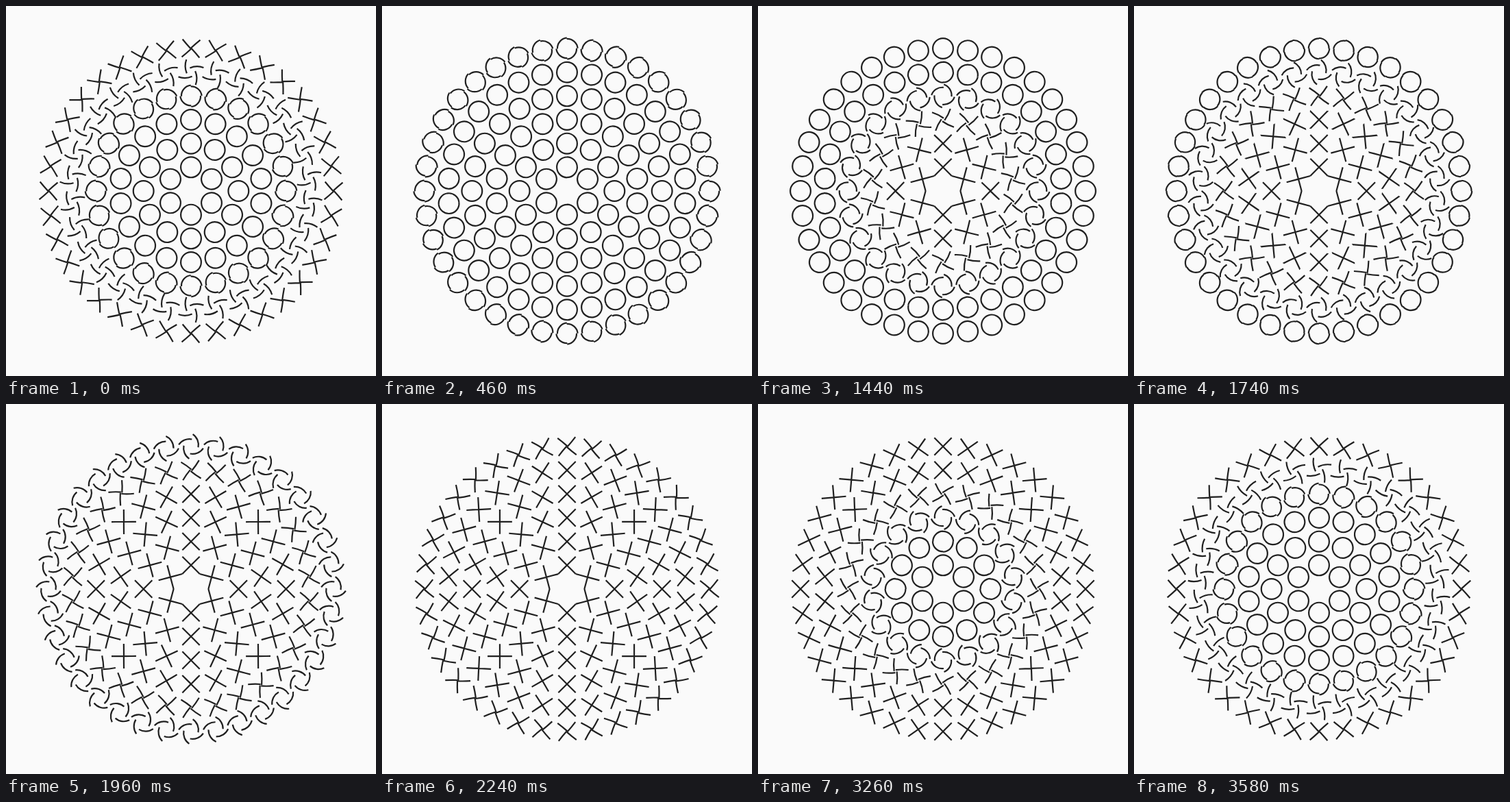
An HTML page with a canvas that plays this animation: 540 by 540 pixels, repeating every 3600 ms.

```html
<!DOCTYPE html>
<html lang="en">
<head>
<meta charset="utf-8">
<title>Circles and crosses</title>
<style>
  html, body { margin: 0; width: 100%; height: 100%; overflow: hidden; background: #fafafa; }
  canvas { display: block; width: 540px; height: 540px; }
</style>
</head>
<body>
<canvas id="stage" width="540" height="540"></canvas>
<script>
const ctx = document.getElementById("stage").getContext("2d");
const SIZE = 540, LOOP = 3600, HALF = LOOP / 2;
const RINGS = 6, SPACING = 104 / 3;
const RADIUS = 14.9, ARM = 17.9;
const FIRST_TURN = 885, RING_DELAY = 230, STEEPNESS = 8;
const QUARTER = Math.PI / 2;

const mix = (a, b, t) => a + (b - a) * t;

function ease(x) {
  return x < 0.5
    ? 0.5 * Math.pow(2 * x, STEEPNESS)
    : 1 - 0.5 * Math.pow(2 - 2 * x, STEEPNESS);
}

// Even turns go from circle to cross, odd turns from cross to circle.
function ringPose(ring, time) {
  const phase = (time - FIRST_TURN - (ring - 1) * RING_DELAY) / HALF + 0.5;
  const turn = Math.floor(phase);
  const step = ease(phase - turn);
  const opening = Math.abs(turn % 2) === 0;
  return {
    bend: opening ? 1 - step : step,
    tilt: QUARTER * (opening ? 1 + step : step)
  };
}

// One of four strokes: a straight arm that curls into a quarter circle as it spins.
function addStroke({ bend, tilt }) {
  const middle = mix(ARM / 2, RADIUS, bend);
  const length = mix(ARM, RADIUS * QUARTER, bend);
  const cos = Math.cos(tilt), sin = Math.sin(tilt);
  if (bend < 0.001) {
    const dx = cos * length / 2, dy = sin * length / 2;
    ctx.moveTo(middle - dx, -dy);
    ctx.lineTo(middle + dx, dy);
    return;
  }
  const sweep = bend * QUARTER, radius = length / sweep;
  const from = tilt - QUARTER - sweep / 2;
  const cx = middle - sin * radius, cy = cos * radius;
  ctx.moveTo(cx + radius * Math.cos(from), cy + radius * Math.sin(from));
  ctx.arc(cx, cy, radius, from, from + sweep);
}

function drawShape(ring, angle, pose) {
  ctx.save();
  ctx.rotate(angle);
  ctx.translate(ring * SPACING, 0);
  ctx.rotate(Math.PI / 4);
  ctx.beginPath();
  for (let i = 0; i < 4; i++) {
    addStroke(pose);
    ctx.rotate(QUARTER);
  }
  ctx.stroke();
  ctx.restore();
}

function draw(time) {
  ctx.setTransform(1, 0, 0, 1, 0, 0);
  ctx.fillStyle = "#fafafa";
  ctx.fillRect(0, 0, SIZE, SIZE);
  ctx.translate(SIZE / 2, SIZE / 2);
  ctx.strokeStyle = "#202020";
  ctx.lineWidth = 2.2;
  for (let ring = 1; ring <= RINGS; ring++) {
    const pose = ringPose(ring, time), count = ring * 6;
    for (let i = 0; i < count; i++) {
      drawShape(ring, -QUARTER + i / count * 2 * Math.PI, pose);
    }
  }
}

const start = performance.now();
function frame() {
  draw((performance.now() - start) % LOOP);
  requestAnimationFrame(frame);
}
frame();
</script>
</body>
</html>
```
